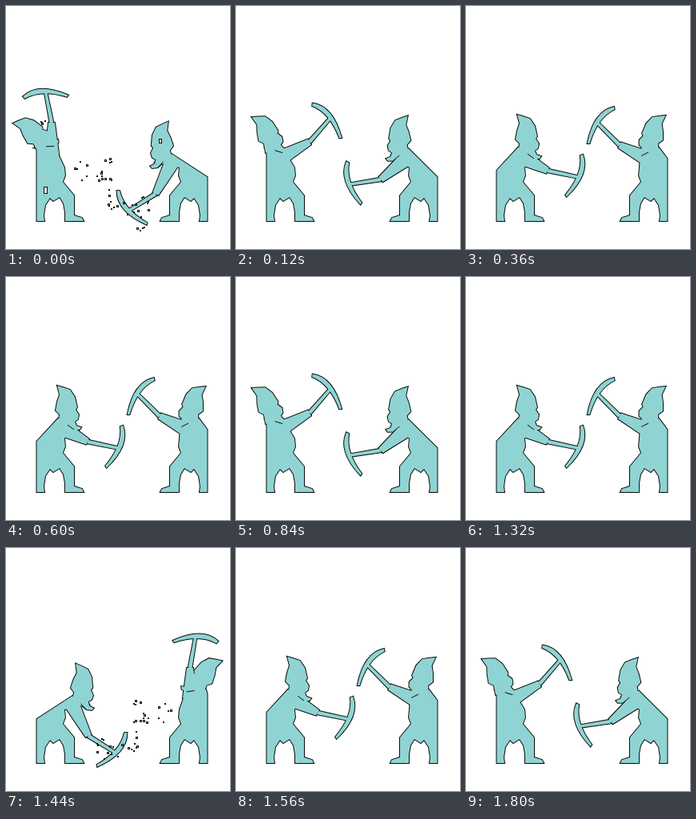
Write an HTML page with a canvas that moves like this. It is 280x304 px and loops after 1.92 s.

```html
<!DOCTYPE html>
<html lang="en">
<head>
<meta charset="utf-8">
<title>Two miners</title>
<style>
  html, body { margin: 0; width: 100%; height: 100%; overflow: hidden; background: #fff; }
  canvas { display: block; width: 280px; height: 304px; }
</style>
</head>
<body>
<canvas id="stage" width="280" height="304"></canvas>
<script>
const ctx = document.getElementById('stage').getContext('2d');
const TEAL = '#8fd4d2', INK = '#080c0c';
const STEP = 120, MIRROR = 290, REACH = 41;

// Both miners face right here; the second one is drawn mirrored.
const HEAD = new Path2D('M-13,-44 -6,-42 3,-39 9,-30 12,-17 10,-14 14,-8 13,-2 9,1 11,6 17,8 15,11 8,11 -1,5 -12,4 -10,-8 -15,-13 -13,-24 -10,-33Z');
const BEARD = new Path2D('M0,5L8,11');
const PICK_HEAD = new Path2D('M-2,-29Q12,-7 -11,27L-13,25Q3,-5 -5,-27Z');
const LEGS = 'L73,202 74,212 71,220 75,225 85,237 85,262 95,265 97,269 74,269 74,258 72,247 67,239 59,244 55,240 49,249 47,262 48,269 38.5,269';

// Swing from raised to struck: neck x, y, head tilt, hand x, y, pick angle.
const LEFT = [
  [47, 172, -40, 57, 146, -101],
  [47, 176, -20, 92, 170, -49],
  [62, 178, -8, 98, 190, -17],
  [77, 180, 0, 102, 206, 12],
  [94, 190, 8, 103, 235, 32]
];
const RIGHT = [
  [52, 174, -28, 60, 150, -100],
  [61, 178, -10, 98, 174, -45],
  [70, 179, -4, 101, 195, -15],
  [86, 182, 3, 109, 217, 9],
  [94, 190, 8, 103, 235, 32]
];

const frameAt = (x, y, deg) => new DOMMatrix().translateSelf(x, y).rotateSelf(deg);
const at = (m, x, y) => m.transformPoint(new DOMPoint(x, y));

function place(path, m) {
  const out = new Path2D();
  out.addPath(path, m);
  return out;
}

// Straight limb that narrows from half width a to half width b.
function limb(x0, y0, x1, y1, a, b) {
  const len = Math.hypot(x1 - x0, y1 - y0);
  const nx = (y0 - y1) / len, ny = (x1 - x0) / len;
  return new Path2D(`M${x0 + nx * a},${y0 + ny * a}L${x1 + nx * b},${y1 + ny * b} ${x1 - nx * b},${y1 - ny * b} ${x0 - nx * a},${y0 - ny * a}Z`);
}

function miner([nx, ny, tilt, hx, hy, angle]) {
  const head = frameAt(nx, ny, tilt);
  const nape = at(head, -12, -3), throat = at(head, 10, 4);
  const rump = Math.min(214, 134 + nx * .93);
  const joint = at(frameAt(hx, hy, angle), REACH, 0);
  const shoulder = [nx + (70 - nx) * .45, ny + (205 - ny) * .45];
  return {
    parts: [
      new Path2D(`M${throat.x},${throat.y}${LEGS} 38.5,${rump} ${nape.x},${nape.y}Z`),
      place(HEAD, head),
      limb(...shoulder, hx, hy, 9, 4),
      limb(hx, hy, joint.x, joint.y, 2.4, 1.7),
      place(PICK_HEAD, frameAt(joint.x, joint.y, angle))
    ],
    beard: place(BEARD, head)
  };
}

function drawMiner({ parts, beard }, flip) {
  ctx.save();
  if (flip) ctx.transform(-1, 0, 0, 1, MIRROR, 0);
  ctx.strokeStyle = INK;
  ctx.lineWidth = 2;
  parts.forEach(p => ctx.stroke(p));
  ctx.fillStyle = TEAL;
  parts.forEach(p => ctx.fill(p));
  ctx.lineWidth = 1;
  ctx.stroke(beard);
  ctx.restore();
}

function seeded(seed) {
  return () => (seed = seed * 16807 % 2147483647) / 2147483647;
}

// Small chips of rock with pale centres, scattered over a box.
function chips(rand, count, x, y, w, h, flip) {
  for (let i = 0; i < count; i++) {
    const px = Math.round(x + rand() * w), py = Math.round(y + rand() * h);
    const size = 2 + Math.round(rand());
    const left = flip ? MIRROR - px : px;
    ctx.fillStyle = INK;
    ctx.fillRect(left, py, size, size);
    ctx.fillStyle = TEAL;
    ctx.fillRect(left + 1, py + 1, size - 2, 1);
  }
}

function gap(x, y, w, h) {
  ctx.fillStyle = INK;
  ctx.fillRect(x - 1, y - 1, w + 2, h + 2);
  ctx.fillStyle = '#fff';
  ctx.fillRect(x, y, w, h);
}

function impact(flip) {
  const rand = seeded(41);
  chips(rand, 19, 85, 190, 47, 30, flip);
  chips(rand, 20, 126, 228, 56, 36, flip);
  if (flip) return;
  chips(rand, 5, 163, 275, 9, 6);
  chips(rand, 4, 43, 140, 6, 6);
  gap(48, 227, 3, 7);
  gap(192, 167, 2, 4);
}

const left = LEFT.map(miner), right = RIGHT.map(miner);
const last = LEFT.length - 1;

// The miners swing in opposition, back and forth through the poses.
function draw(i) {
  ctx.fillStyle = '#fff';
  ctx.fillRect(0, 0, 280, 304);
  drawMiner(left[i], false);
  drawMiner(right[last - i], true);
  if (i === 0 || i === last) impact(i === last);
}

const start = performance.now();
let shown = -1;
function tick() {
  const step = Math.floor((performance.now() - start) / STEP) % (2 * last);
  const i = last - Math.abs(last - step);
  if (i !== shown) draw(shown = i);
  requestAnimationFrame(tick);
}
tick();
</script>
</body>
</html>
```
